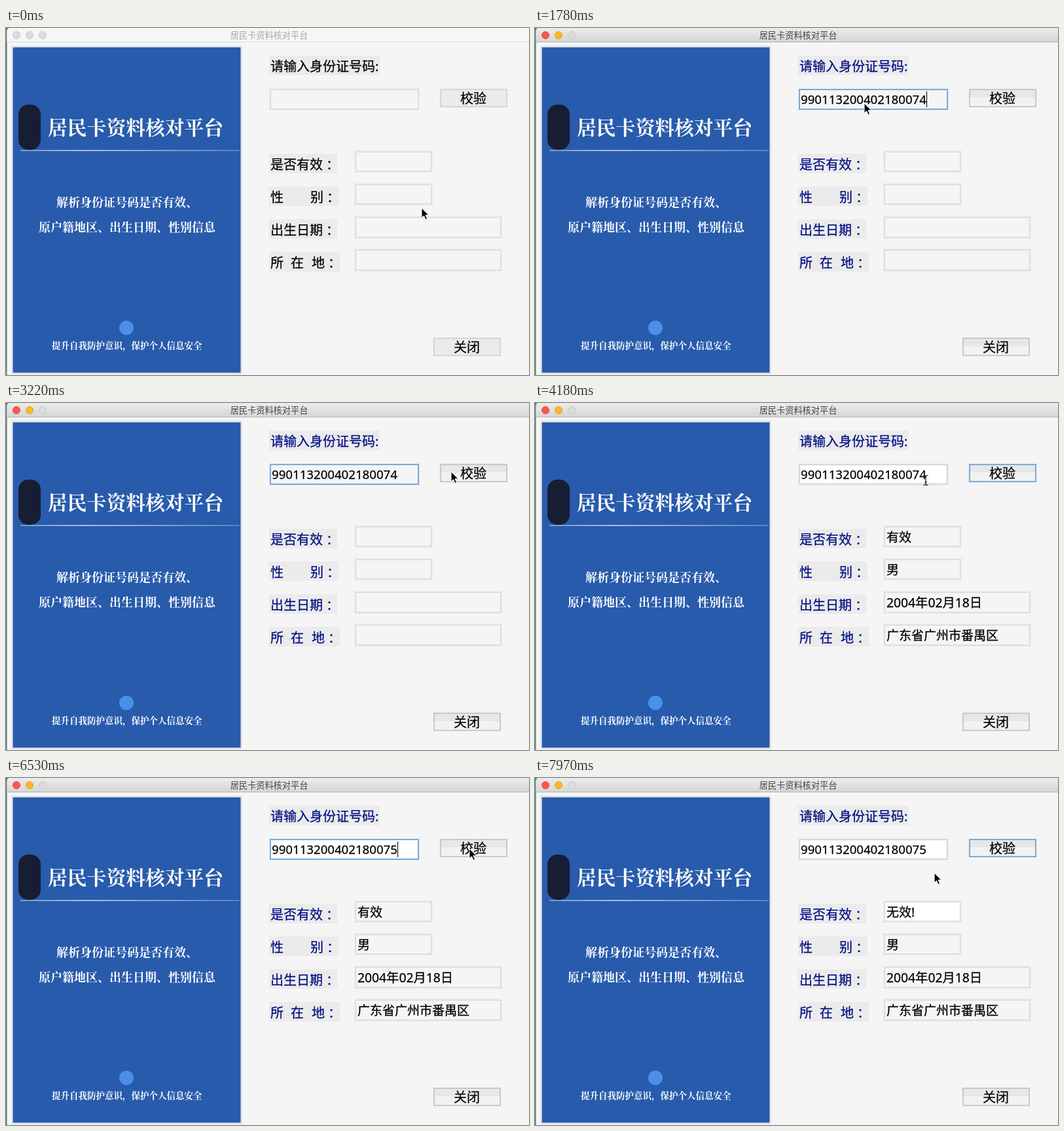
An HTML page that plays this animation: 799x530 px, repeating every 8 s.

```html
<!DOCTYPE html>
<html lang="zh-CN">
<head>
<meta charset="utf-8">
<style>
html, body { margin: 0; width: 100%; height: 100%; overflow: hidden; background: #f5f5f5; }
svg { display: block; }
text { font-family: "Noto Sans", "Noto Sans CJK SC", "Noto Sans CJK", sans-serif; white-space: pre; }
.serif text { font-family: "Noto Serif CJK SC", "Noto Serif CJK", "Noto Sans CJK SC", serif; font-weight: 700; fill: #fff; }
.ui { fill: #000; stroke: #000; stroke-width: .25; }
.on .label { fill: #000d82; stroke: #000d82; }
.label { font-size: 20px; }
.mid { text-anchor: middle; }
.value { font-size: 19px; }
.field { fill: #f5f5f5; stroke: #d6d6d6; }
.halo { fill: none; stroke: #e9e9e9; stroke-width: 2; }
.on #idBox { stroke: #c6c6c6; }
.field.fresh { fill: #fff; }
.button { fill: #ebebeb; stroke: #c4c4c4; }
.on .button { fill: url(#face); stroke: #a9a9a9; }
.on .down { fill: #d4d4d4; }
.ring { fill: none; stroke: #78acdf; stroke-width: 2; }
#bar { fill: #f6f6f6; }
.on #bar { fill: url(#chrome); }
#edge { fill: #dadada; }
.on #edge { fill: #b4b4b4; }
#title { font-size: 13.2px; fill: #a9a9a9; }
.on #title { fill: #454545; }
.light { fill: #dcdcdc; stroke: #c8c8c8; }
.on .red { fill: #fc5650; stroke: #e2463f; }
.on .amber { fill: #fdb827; stroke: #e0a01f; }
</style>
</head>
<body>
<svg id="stage" width="799" height="530" viewBox="0 0 799 530">
  <defs>
    <linearGradient id="chrome" x2="0" y2="1"><stop stop-color="#ececec"/><stop offset="1" stop-color="#d6d6d6"/></linearGradient>
    <linearGradient id="face" x2="0" y2="1"><stop offset=".47" stop-color="#e7e7e7"/><stop offset=".47" stop-color="#f2f2f2"/></linearGradient>
    <linearGradient id="rule"><stop stop-color="#fff" stop-opacity=".6"/><stop offset=".3" stop-color="#fff"/><stop offset="1" stop-color="#fff" stop-opacity=".4"/></linearGradient>
  </defs>
  <rect width="799" height="530" fill="#557b74"/>
  <path d="M1.5 530V5Q1.5 0 6 0H799V530Z" fill="#f5f5f5"/>
  <path id="bar" d="M1.5 21V5Q1.5 0 6 0H799V21Z"/>
  <rect id="edge" x="1.5" y="21" width="798" height="1"/>
  <circle class="light red" cx="16" cy="11" r="5.5"/>
  <circle class="light amber" cx="36" cy="11" r="5.5"/>
  <circle class="light" cx="56" cy="11" r="5.5"/>
  <text id="title" class="mid" x="402" y="16">居民卡资料核对平台</text>

  <rect x="9" y="28" width="351" height="500" fill="#f5f5f5" stroke="#e6e6e6" stroke-width="2"/>
  <rect x="10.5" y="29.5" width="348" height="497" fill="#285bac"/>
  <rect x="19" y="117" width="34" height="69" rx="15" fill="#171d33"/>
  <rect x="22" y="186.5" width="335" height="1.2" fill="url(#rule)"/>
  <g class="serif">
    <text x="64" y="163" font-size="29.8">居民卡资料核对平台</text>
    <text x="77" y="273" font-size="18">解析身份证号码是否有效、</text>
    <text x="50" y="311" font-size="18">原户籍地区、出生日期、性别信息</text>
    <text x="70" y="490" font-size="13.5">提升自我防护意识，保护个人信息安全</text>
  </g>
  <circle cx="184" cy="458" r="11" fill="#4a90e8"/>

  <g id="form"></g>
  <rect id="idRing" class="ring" x="404" y="94" width="226" height="30"/>
  <rect id="checkRing" class="ring" x="664" y="94" width="101" height="26"/>
  <text id="idText" class="ui" x="406" y="116" font-size="18.65"></text>
  <rect id="caret" y="97" width="1" height="24"/>
  <g id="results">
    <text id="valid" class="ui value" x="537" y="212"></text>
    <text class="ui value" x="537" y="262">男</text>
    <text class="ui" x="537" y="312" font-size="19.3">2004年02月18日</text>
    <text class="ui value" x="537" y="362">广东省广州市番禺区</text>
  </g>
  <g id="pointer">
    <path id="arrow" d="M0 0V15L3.5 11.8 6 17.5 8.5 16.4 6 10.8H11Z" stroke="#fff" stroke-width="1" stroke-linejoin="round"/>
    <path id="beam" d="M-3.5-7.5Q0-7.5 0-5Q0-7.5 3.5-7.5M0-5V5M-3.5 7.5Q0 7.5 0 5Q0 7.5 3.5 7.5M-2 3H2" fill="none" stroke="#111" stroke-width="1.2"/>
  </g>
</svg>
<script>
const $ = id => document.getElementById(id);

const label = (y, w, xs, text) =>
  `<rect x="402" y="${y}" width="${w}" height="30" fill="#ebebeb"/>
   <text class="ui label" x="${xs}" y="${y + 24}">${text}</text>`;
const field = (x, y, w, h, id = "") =>
  `<rect class="halo" x="${x}" y="${y}" width="${w}" height="${h}"/>
   <rect class="field" id="${id}" x="${x + 1.5}" y="${y + 1.5}" width="${w - 3}" height="${h - 3}"/>`;
const button = (x, y, id, text) =>
  `<rect class="halo" x="${x - .5}" y="${y - .5}" width="102" height="27"/>
   <rect class="button" id="${id}" x="${x}" y="${y}" width="101" height="26"/>
   <text class="ui mid" x="${x + 50}" y="${y + 21}" font-size="20">${text}</text>`;
// the colon sits in the middle of its cell
const colon = '<tspan dx="5">：</tspan>';

$("form").innerHTML =
  label(42, 169, "404", "请输入身份证号码:") +
  label(192, 104, "404", "是否有效" + colon) +
  label(242, 106, "404 465 485", "性别" + colon) +
  label(292, 104, "404", "出生日期" + colon) +
  label(342, 108, "404 435 467 487", "所在地" + colon) +
  field(403, 93, 228, 32, "idBox") +
  field(533, 188, 118, 32, "validBox") + field(533, 238, 118, 32) +
  field(533, 288, 224, 33) + field(533, 338, 224, 33) +
  button(664, 94, "check", "校验") + button(654, 474, "close", "关闭");

const LOOP = 8000;
const STEM = "99011320040218007";
// time, x, y of the pointer
const path = [
  [60, 635, 275], [300, 612, 248], [480, 548, 195], [700, 457, 120], [1000, 457, 120],
  [1060, 454, 121], [1420, 454, 121], [1780, 503, 115], [1900, 552, 112], [2140, 552, 112],
  [2740, 708, 108], [2860, 708, 108], [3220, 680, 105], [3340, 686, 107], [3880, 686, 107],
  [4180, 597, 118], [5950, 600, 112], [6250, 670, 96], [6530, 708, 108], [7070, 708, 108],
  [7560, 558, 228], [7910, 606, 188], [7970, 610, 145]
];
const caretOn = [[820, 2260], [2700, 3160], [4400, 5470], [5650, 6050], [6450, 6710]];

const within = (t, a, b) => t >= a && t < b;
const show = (id, on) => $(id).setAttribute("visibility", on ? "visible" : "hidden");
const mark = (id, name, on) => $(id).classList.toggle(name, on);

function pointerAt(t) {
  const i = path.findIndex(p => p[0] > t);
  if (i < 0) return path[path.length - 1].slice(1);
  if (i === 0) return path[0].slice(1);
  const [t0, x0, y0] = path[i - 1], [t1, x1, y1] = path[i];
  const k = (t - t0) / (t1 - t0);
  return [x0 + (x1 - x0) * k, y0 + (y1 - y0) * k].map(Math.round);
}

function draw(t) {
  const active = t >= 820;
  const onButton = within(t, 3400, 4400) || t >= 6710;
  const number = t < 1600 ? "" : t < 5240 ? STEM + "4" : t < 5650 ? STEM : STEM + "5";

  mark("stage", "on", active);
  mark("idBox", "fresh", t >= 3400);
  mark("validBox", "fresh", t >= 6830);
  mark("check", "down", within(t, 3400, 3580) || within(t, 6710, 6830));
  show("idRing", active && !onButton);
  show("checkRing", onButton);

  $("idText").textContent = number;
  $("caret").setAttribute("x", Math.round(406 + number.length * 10.67));
  show("caret", caretOn.some(([a, b]) => within(t, a, b)));

  $("valid").textContent = t < 6830 ? "有效" : "无效!";
  show("results", t >= 3580);

  const beam = within(t, 1060, 1420) || within(t, 4120, 4580);
  const hidden = within(t, 4580, 5950);
  $("pointer").setAttribute("transform", `translate(${pointerAt(t)})`);
  show("beam", beam && !hidden);
  show("arrow", !beam && !hidden);
}

const start = performance.now();
function tick() {
  draw((performance.now() - start) % LOOP);
  requestAnimationFrame(tick);
}
tick();
</script>
</body>
</html>
```
